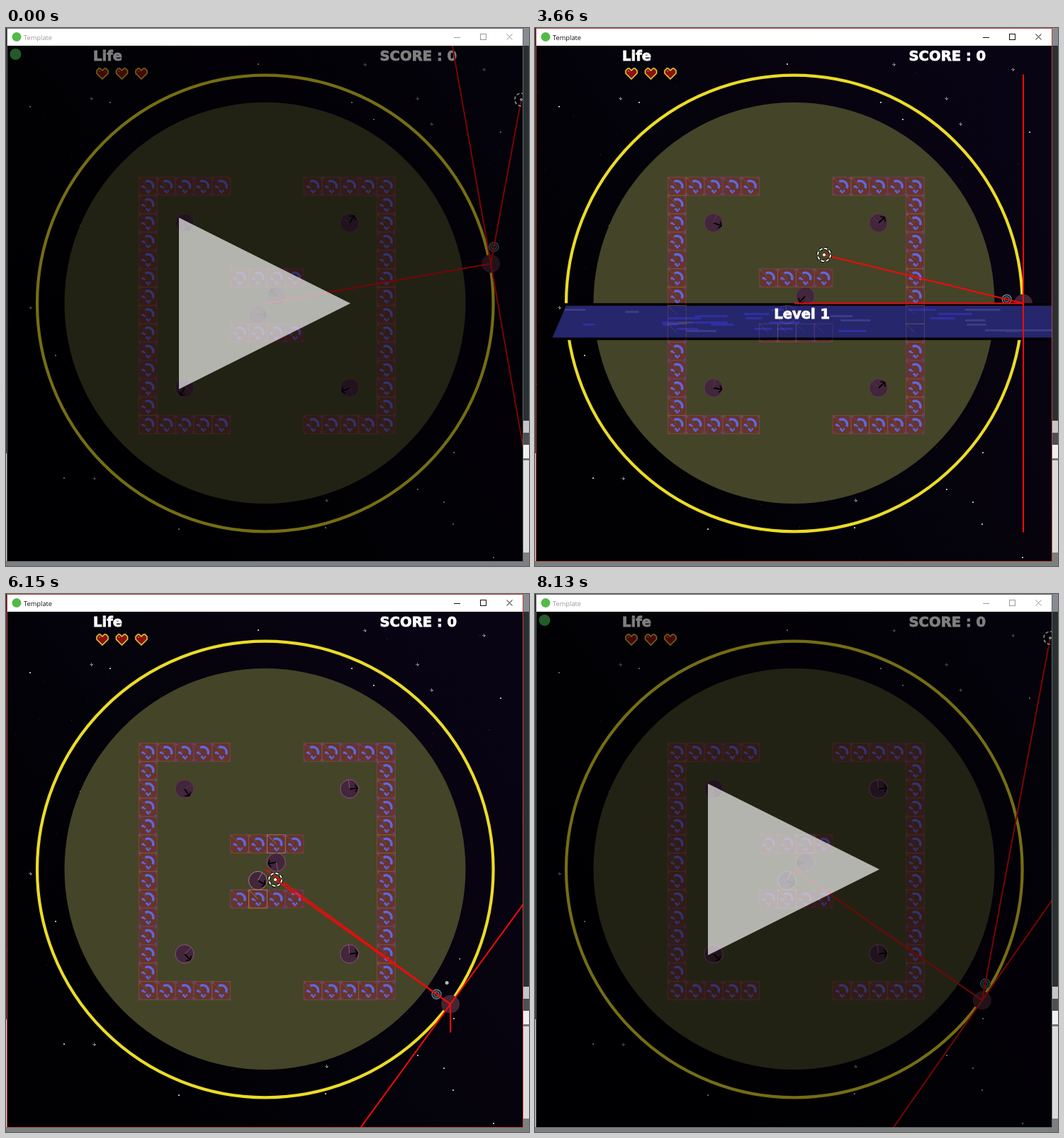
An HTML page with a canvas that plays this animation: 738 by 759 pixels, repeating every 8.16 s.

```html
<!DOCTYPE html>
<html lang="en">
<head>
<meta charset="utf-8">
<title>Orbit shooter</title>
<style>
html, body { margin: 0; width: 100%; height: 100%; overflow: hidden; background: #7c8080; }
canvas { display: block; }
</style>
</head>
<body>
<canvas id="stage" width="738" height="759"></canvas>
<script>
const ctx = document.getElementById('stage').getContext('2d');
const LOOP = 8160, RESUME = 570, PAUSE = 8115;
const CX = 366, CY = 388.5, ORBIT = 323;
const CELL = 25.86, ORIGIN = 200.3, TOP = 223.3;
const RAD = Math.PI / 180;

// Seeded random numbers
function seeded(seed) {
  return () => (seed = (seed * 16807) % 2147483647) / 2147483647;
}

// Value at time t from rows of [time, ...values]
function track(rows, t, ease = k => k) {
  if (t <= rows[0][0]) return rows[0].slice(1);
  for (let i = 1; i < rows.length; i++) {
    const a = rows[i - 1], b = rows[i];
    if (t < b[0]) {
      const k = ease((t - a[0]) / (b[0] - a[0]));
      return a.slice(1).map((v, j) => v + (b[j + 1] - v) * k);
    }
  }
  return rows[rows.length - 1].slice(1);
}
const smooth = k => k * k * (3 - 2 * k);

function rect(x, y, w, h, color) {
  ctx.fillStyle = color;
  ctx.fillRect(x, y, w, h);
}
function disc(x, y, r, color) {
  ctx.fillStyle = color;
  ctx.beginPath();
  ctx.arc(x, y, r, 0, 7);
  ctx.fill();
}
function ring(x, y, r, width, color) {
  ctx.strokeStyle = color;
  ctx.lineWidth = width;
  ctx.beginPath();
  ctx.arc(x, y, r, 0, 7);
  ctx.stroke();
}
function path(points, closed) {
  ctx.beginPath();
  for (const [x, y] of points) ctx.lineTo(x, y);
  if (closed) ctx.closePath();
}
function line(x1, y1, x2, y2, color, width = 2) {
  ctx.strokeStyle = color;
  ctx.lineWidth = width;
  path([[x1, y1], [x2, y2]]);
  ctx.stroke();
}
function text(str, x, y, font, color) {
  ctx.font = font;
  ctx.fillStyle = color;
  ctx.fillText(str, x, y);
}
// Heavy game lettering
function label(str, x, y) {
  text(str, x, y, 'bold 19.6px "DejaVu Sans", sans-serif', '#fff');
  ctx.strokeStyle = '#fff';
  ctx.lineWidth = 0.8;
  ctx.strokeText(str, x, y);
}

// Level layout
const place = (c, r) => ({ c, r, x: ORIGIN + c * CELL, y: TOP + r * CELL });
const blocks = [];
for (let r = 0; r < 14; r++) {
  for (let c = 0; c < 14; c++) {
    const side = c === 0 || c === 13;
    const rim = (r === 0 || r === 13) && (c < 5 || c > 8);
    const core = (r === 5 || r === 8) && c > 4 && c < 9;
    if (side || rim || core) blocks.push(place(c, r));
  }
}
const tint = seeded(77);
const tints = ['#b4763a', '#8a4f8c', '#a8604c', '#a58a3c', '#7c5a98', '#a0706c'];
for (const b of blocks) {
  b.tint = tints[Math.floor(tint() * tints.length)];
  b.hot = (b.c === 7 && b.r === 5) || (b.c === 6 && b.r === 8);
}

// Turrets: arrow offset while playing, arrow angle on the first pause screen
const turrets = [[2, 2, 20, 60], [11, 2, -42, -57], [7, 6, 133, -130],
  [6, 7, -7, 0], [2, 11, 10, 120], [11, 11, -42, 155]]
  .map(([c, r, offset, still]) => ({ ...place(c, r), offset, still }));

const bright = [[120, 99], [146, 104], [33, 110], [34, 394], [69, 461], [81, 634],
  [124, 635], [243, 706], [450, 704], [452, 666], [580, 650], [687, 746], [580, 99],
  [487, 104], [697, 146], [600, 135], [630, 699], [617, 668], [506, 51], [355, 50],
  [518, 128], [674, 58], [104, 278], [631, 598]];
const starRand = seeded(5);
const faint = Array.from({ length: 80 }, () =>
  [2 + starRand() * 726, 26 + starRand() * 724, 0.1 + starRand() * 0.25]);

const streakRand = seeded(31);
const streaks = Array.from({ length: 28 }, (_, i) => ({
  x: 15 + streakRand() * 640, y: 396 + Math.floor(streakRand() * 12) * 3,
  w: 16 + streakRand() * 36, color: i % 3 ? '#2f2fa0' : '#3c3c86'
}));

function desktop(active) {
  rect(0, 0, 738, 759, '#7c8080');
  rect(0, 0, 2, 600, '#23282c');
  rect(0, 600, 2, 152, '#c8c8c8');
  rect(730, 0, 8, 25, '#868c92');
  rect(730, 25, 8, 529, '#2b3033');
  rect(730, 554, 8, 17, '#c6c6c6');
  rect(730, 571, 8, 17, '#4c5052');
  rect(730, 588, 8, 20, '#f0f0f0');
  rect(730, 607, 8, 3, '#777');
  rect(730, 610, 8, 130, '#dcdcdc');
  rect(1, 0, 729, 753, active ? '#b8473c' : '#60656a');
  rect(2, 1, 727, 24, '#fff');
  disc(15, 12.5, 6.5, '#55b947');
  const ink = active ? '#111' : '#999';
  text('Template', 25, 16.5, '9.3px "Open Sans", "Noto Sans", sans-serif', ink);
  line(632, 13.5, 641, 13.5, ink, 1);
  ctx.strokeRect(669.5, 8.5, 8, 8);
  line(706.5, 8.5, 714.5, 16.5, ink, 1);
  line(714.5, 8.5, 706.5, 16.5, ink, 1);
}

function space() {
  const g = ctx.createLinearGradient(150, 600, 729, 200);
  g.addColorStop(0, '#010104');
  g.addColorStop(1, '#090414');
  rect(2, 25, 727, 727, g);
  for (const [x, y, a] of faint) rect(x, y, 1, 1, `rgba(200,200,220,${a})`);
  bright.forEach(([x, y], i) => {
    rect(x, y, 2, 2, '#b4b4c0');
    if (i % 3 === 0) {
      rect(x - 2, y, 5, 1, '#77778a');
      rect(x, y - 2, 1, 5, '#77778a');
    }
  });
  disc(CX - 0.5, CY - 0.5, 283, '#444429');
  ring(CX - 0.2, CY, 321.8, 4.2, '#ebdc26');
}

function block({ x, y }) {
  const blue = '#5c6ade';
  ctx.save();
  ctx.translate(x, y);
  rect(-13, -13, 26, 26, '#65342f');
  ctx.strokeStyle = blue;
  ctx.lineWidth = 3.4;
  ctx.beginPath();
  ctx.arc(0, 0, 7.5, -2.1, 0.4);
  ctx.stroke();
  rect(-9, -1, 4, 3, blue);
  rect(-6, 1, 3, 2, blue);
  rect(-3, 5, 3, 3, blue);
  rect(-1, 7, 3, 3, blue);
  rect(2, 5, 2, 3, blue);
  for (const sx of [-12, 10]) for (const sy of [-12, 10]) rect(sx, sy, 2, 2, '#634488');
  ctx.restore();
}

function turret({ x, y }, deg) {
  disc(x, y, 13, '#42263b');
  ctx.save();
  ctx.translate(x, y);
  ctx.rotate(deg * RAD);
  line(0, 0, 12, 0, '#000', 1.8);
  ctx.lineWidth = 1.5;
  path([[8, -5], [12, 0], [8, 5]]);
  ctx.stroke();
  ctx.restore();
}

function heart(x) {
  const half = [[0, 8], [-8, 0], [-8, -4], [-5, -7], [-3, -7], [0, -4]];
  const other = half.slice(1, 5).reverse().map(([a, b]) => [-a, b]);
  ctx.save();
  ctx.translate(x, 64);
  path([...half, ...other], true);
  ctx.lineWidth = 4;
  ctx.strokeStyle = '#161004';
  ctx.stroke();
  ctx.fillStyle = '#8d1014';
  ctx.fill();
  ctx.lineWidth = 1.5;
  ctx.strokeStyle = '#e0d23a';
  ctx.stroke();
  rect(-5, -4, 2, 2, '#c8504c');
  ctx.restore();
}

function banner(dx, glow) {
  const mix = (a, b) => Math.round(a + (b - a) * glow);
  ctx.save();
  ctx.translate(dx, 0);
  const edge = [[18, 390], [732, 390], [711, 438.5], [-3, 438.5]];
  path(edge, true);
  ctx.fillStyle = `rgb(${mix(60, 38)},${mix(60, 38)},${mix(104, 108)})`;
  ctx.fill();
  ctx.globalAlpha = glow;
  for (const s of streaks) rect(s.x, s.y, s.w, 3, s.color);
  rect(610, 425, 100, 3, '#3c3c86');
  ctx.globalAlpha = 1;
  path(edge, true);
  ctx.lineWidth = 3.5;
  ctx.strokeStyle = '#000';
  ctx.stroke();
  ctx.restore();
}

function outlines(t, angleOf) {
  const base = t < RESUME ? 0.3 : track([[1380, 1], [2220, 0.3]], t)[0];
  const lit = t > 5576;
  for (const b of blocks) {
    ctx.globalAlpha = lit && b.hot ? 1 : base;
    line(b.x - 13, b.y - 13, b.x, b.y, b.tint, 1);
    ctx.strokeRect(b.x - 12.9, b.y - 12.9, 25.8, 25.8);
  }
  turrets.forEach((u, i) => {
    ctx.globalAlpha = lit && i ? 0.9 : base;
    const a = (angleOf(u) - 90) * RAD;
    const color = i === 3 ? '#b08a94' : '#95568a';
    ring(u.x, u.y, 13, 1, color);
    line(u.x, u.y, u.x + 13 * Math.cos(a), u.y + 13 * Math.sin(a), color, 1);
  });
  ctx.globalAlpha = 1;
}

function crosshair(x, y) {
  ctx.setLineDash([4.2, 2.87]);
  ring(x, y, 9, 4, '#000');
  ring(x, y, 9, 2, '#fff');
  ctx.setLineDash([]);
  rect(x - 2, y - 1, 4, 2, '#fff');
  rect(x - 1, y - 2, 2, 4, '#fff');
}

const heading = t => t < RESUME ? -10 : track(
  [[5576, 0], [6150, 36], [6864, 80.8], [6990, 72.9], [7700, 34.9]], t)[0];
const onOrbit = (deg, r) => [CX + r * Math.cos(deg * RAD), CY + r * Math.sin(deg * RAD)];

function dust(t) {
  for (let k = 0; k < 2; k++) {
    const born = (Math.floor((t - 54) / 116) - k) * 116 + 54;
    if (born < 5576 || born > 7700) continue;
    const [x, y] = onOrbit(heading(born), 302);
    disc(x, y, 3.4 * (1 - (t - born) / 250), '#b8b8b0');
  }
}

function draw(t) {
  const paused = t < RESUME || t >= PAUSE;
  const deg = heading(t);
  const [px, py] = onOrbit(deg, ORBIT);
  const [ax, ay] = track([[570, 727, 101], [1200, 408, 320], [4500, 408, 320],
    [5240, 380, 322], [6100, 380, 403], [6990, 382, 399], [7750, 727, 62]], t, smooth);
  const angleOf = u => t < RESUME ? u.still : deg + u.offset;

  desktop(!paused);
  ctx.save();
  ctx.beginPath();
  ctx.rect(2, 25, 727, 727);
  ctx.clip();

  space();
  blocks.forEach(block);
  turrets.forEach(u => turret(u, angleOf(u)));
  disc(px, py, 13, '#432534');
  dust(t);
  const reach = Math.hypot(ax - px, ay - py);
  const ox = px + (ax - px) / reach * 24, oy = py + (ay - py) / reach * 24;
  disc(ox, oy, 7.5, '#14191c');
  ring(ox, oy, 6.5, 1.3, '#6a8794');
  ring(ox, oy, 3.5, 1.3, '#5d7f8c');

  // HUD slides in from both sides
  const hud = t < RESUME ? 0 : Math.max(0, 2220 - t) * 0.121;
  label('Life', 123 - hud, 46);
  label('SCORE : 0', 527.5 + hud, 46);
  [136, 163.5, 191].forEach(heart);

  if (t > RESUME && t < 4700) {
    const before = Math.max(0, 2220 - t), after = Math.max(0, t - 3630);
    banner(after * 0.8 - before * 0.743, 1 - Math.min(1, before / 840));
    label('Level 1', 323.5 + after * 0.44 - before * 0.325, 409.5);
  }

  outlines(t, angleOf);
  const red = '#f00a0a';
  const tx = -Math.sin(deg * RAD) * ORBIT, ty = Math.cos(deg * RAD) * ORBIT;
  line(px - tx, py - ty, px + tx, py + ty, red);
  line(CX, CY, px, py, red);
  line(px, py, ax, ay, red);
  if (t > 5576 && t < 6864) line(px, py, px, py + 40, red);
  else if (t >= 6864 && t < 7700) line(px, py, px + 40, py, red);
  crosshair(ax, ay);

  if (paused) {
    rect(2, 25, 727, 727, 'rgba(0,0,0,.5)');
    disc(13.5, 37, 8, '#245a2a');
    path([[244, 267.5], [486, 388.5], [244, 509.5]], true);
    ctx.fillStyle = 'rgba(255,255,255,.66)';
    ctx.fill();
  }
  ctx.restore();
}

const start = performance.now();
function tick() {
  draw((performance.now() - start) % LOOP);
  requestAnimationFrame(tick);
}
tick();
</script>
</body>
</html>
```
